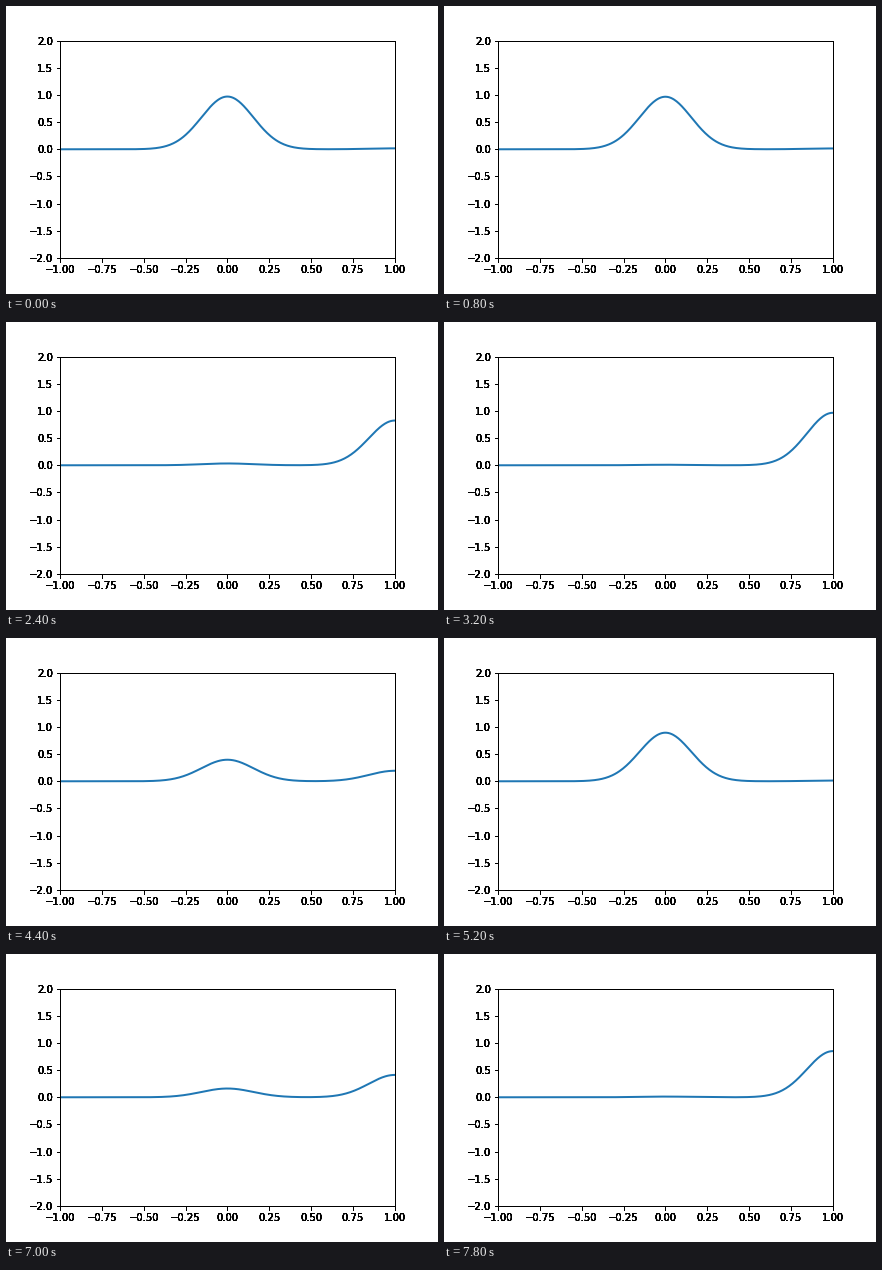
A matplotlib script that plays this animation: 432 by 288 pixels, repeating every 8000 ms.

```python
import numpy as np
import matplotlib.pyplot as plt
from matplotlib.animation import FuncAnimation

FRAMES, STEP = 40, 200
LAYERS = 8          # tick labels are overprinted, which makes them heavy
WIDTH = 0.048       # squared width of each hump

plt.rcParams["font.family"] = "DejaVu Sans"
plt.rcParams["font.size"] = 10

fig = plt.figure(figsize=(6, 4), dpi=72, facecolor="white")
BOX = [0.125, 0.125, 0.775, 0.755]


def add_layer(z):
    ax = fig.add_axes(BOX, zorder=z)
    ax.set(xlim=(-1, 1), ylim=(-2, 2))
    ax.patch.set_visible(False)
    return ax


layers = [add_layer(z) for z in range(LAYERS)]
x = np.linspace(-1, 1, 400)
line, = layers[0].plot([], [], lw=2, color="#1f77b4")


def hump(center):
    return np.exp(-(x - center) ** 2 / WIDTH)


def profile(t):
    """Two humps trading height in a slowly damped oscillation."""
    scale = 1.115 - 0.0103 * t
    swing = (0.44 - 0.004 * t) * np.cos(np.radians(70.8 * t - 29.4))
    left = (scale * (0.5 + swing)) ** 2
    right = (scale * (0.5 - swing)) ** 2
    return left * hump(0) + right * hump(1)


def update(i):
    line.set_data(x, profile(i * STEP / 1000))
    return line,


anim = FuncAnimation(fig, update, frames=FRAMES, interval=STEP,
                     repeat=True, repeat_delay=0, blit=False)
plt.show()
```
